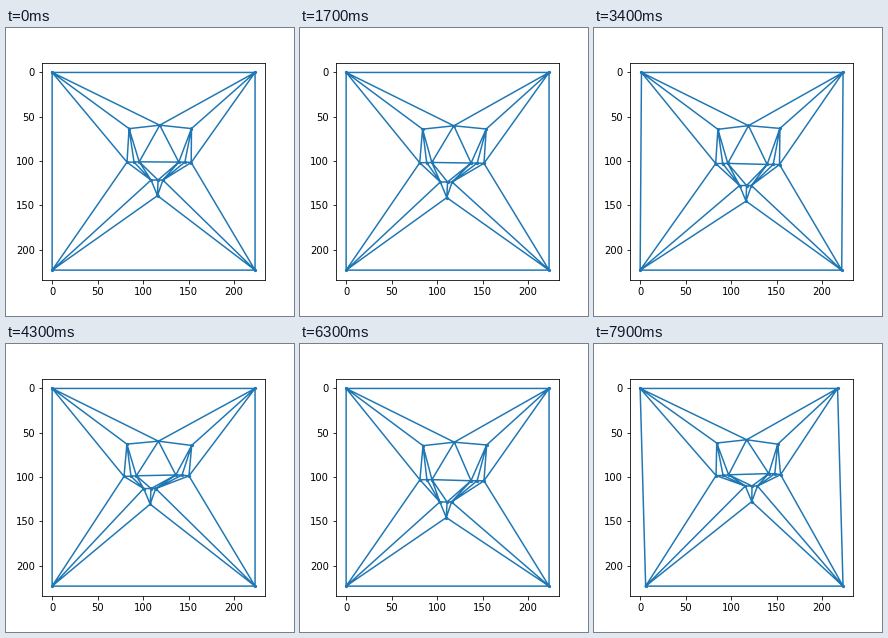
Write a matplotlib script that moves like this. It is 288x288 px and loops after 8 s.

```python
import numpy as np
import matplotlib.pyplot as plt
from matplotlib.animation import FuncAnimation

FRAMES, INTERVAL = 80, 100
SIZE = 223  # side of the square holding the mesh

# name: x, dx/du, dx/dv, y, dy/du, dy/dv  (u, v: nose offset)
FACE = {
    "A": (118.0, .04, .13, 59.15, -.095, .09),
    "B": (84.5, .17, .13, 63.0, -.06, .125),
    "C": (152.7, -.13, .09, 63.2, -.105, -.02),
    "D": (82.6, .33, .09, 100.6, -.02, .25),
    "E": (90.3, .335, .09, 100.5, -.01, .26),
    "F": (96.1, .34, .065, 100.1, -.02, .29),
    "G": (139.7, .385, .03, 100.05, -.02, .435),
    "H": (146.4, .375, .03, 100.1, -.02, .42),
    "I": (153.2, .285, .03, 100.7, -.02, .37),
    "J": (110.4, 1.05, 0, 119, 0, 1),
    "K": (118, 1, 0, 119, 0, 1),
    "L": (123.5, 1.06, -.02, 119, 0, 1),
    "M": (117.5, 1.05, 0, 136.6, 0, 1),
}
NAMES = "".join(FACE) + "pqrs"  # p, q, r, s: corners, clockwise from top left
EDGES = ("pq qr rs sp pA pB pD qA qC qI sD sJ sM rI rL rM "
         "AB AC BD BE BF AF AG FG CG CH CI DE EF GH HI "
         "DJ EJ FJ FK GK GL HL IL JK KL JM KM LM").split()
PAIRS = np.array([[NAMES.index(a), NAMES.index(b)] for a, b in EDGES])
COEF = np.array(list(FACE.values())).reshape(-1, 2, 3)

# the nose circles clockwise on a widening path
KEY_T = np.array([0, 1.7, 2.5, 4.3, 5.4, 6.3, 7.9])
KEY_ANGLE = np.array([124, 505, 679, 933, 1096, 1208, 1379])
KEY_RADIUS = np.array([2.9, 8.0, 6.7, 11.1, 10.8, 11.5, 10.2])


def hermite(t, xs, ys):
    slope = np.gradient(ys, xs)
    i = int(np.clip(np.searchsorted(xs, t, "right") - 1, 0, len(xs) - 2))
    h = xs[i + 1] - xs[i]
    s = (t - xs[i]) / h
    return ((1 + 2 * s) * (1 - s) ** 2 * ys[i] + s * (1 - s) ** 2 * h * slope[i]
            + s * s * (3 - 2 * s) * ys[i + 1] + s * s * (s - 1) * h * slope[i + 1])


def mesh(t):
    angle = np.radians(hermite(t, KEY_T, KEY_ANGLE))
    radius = hermite(t, KEY_T, KEY_RADIUS)
    u, v = radius * np.cos(angle), radius * np.sin(angle)
    face = COEF @ np.array([1, u, v])
    # opposite corners move in together, never past the square
    near = max(0, .26 * u + .233 * v - .28)
    far = max(0, .41 * u - .44 * v + .1)
    corners = [(near, 0), (SIZE - far, 0), (SIZE - near, SIZE), (far, SIZE)]
    return np.vstack([face, corners])


fig, ax = plt.subplots(figsize=(4, 4), dpi=72)
fig.subplots_adjust(left=.125, right=.9, bottom=.125, top=.88)


def draw(frame):
    pts = mesh(frame * INTERVAL / 1000)
    gaps = np.full((len(PAIRS), 1, 2), np.nan)
    path = np.concatenate([pts[PAIRS], gaps], axis=1).reshape(-1, 2)
    ax.clear()
    ax.plot(*path.T, color="C0", lw=1.5)
    ax.scatter(*pts.T, s=5, color="C0")
    ax.invert_yaxis()
    return ax.get_children()


anim = FuncAnimation(fig, draw, frames=FRAMES, init_func=lambda: [],
                     interval=INTERVAL, repeat=True, repeat_delay=0)
plt.show()
```
